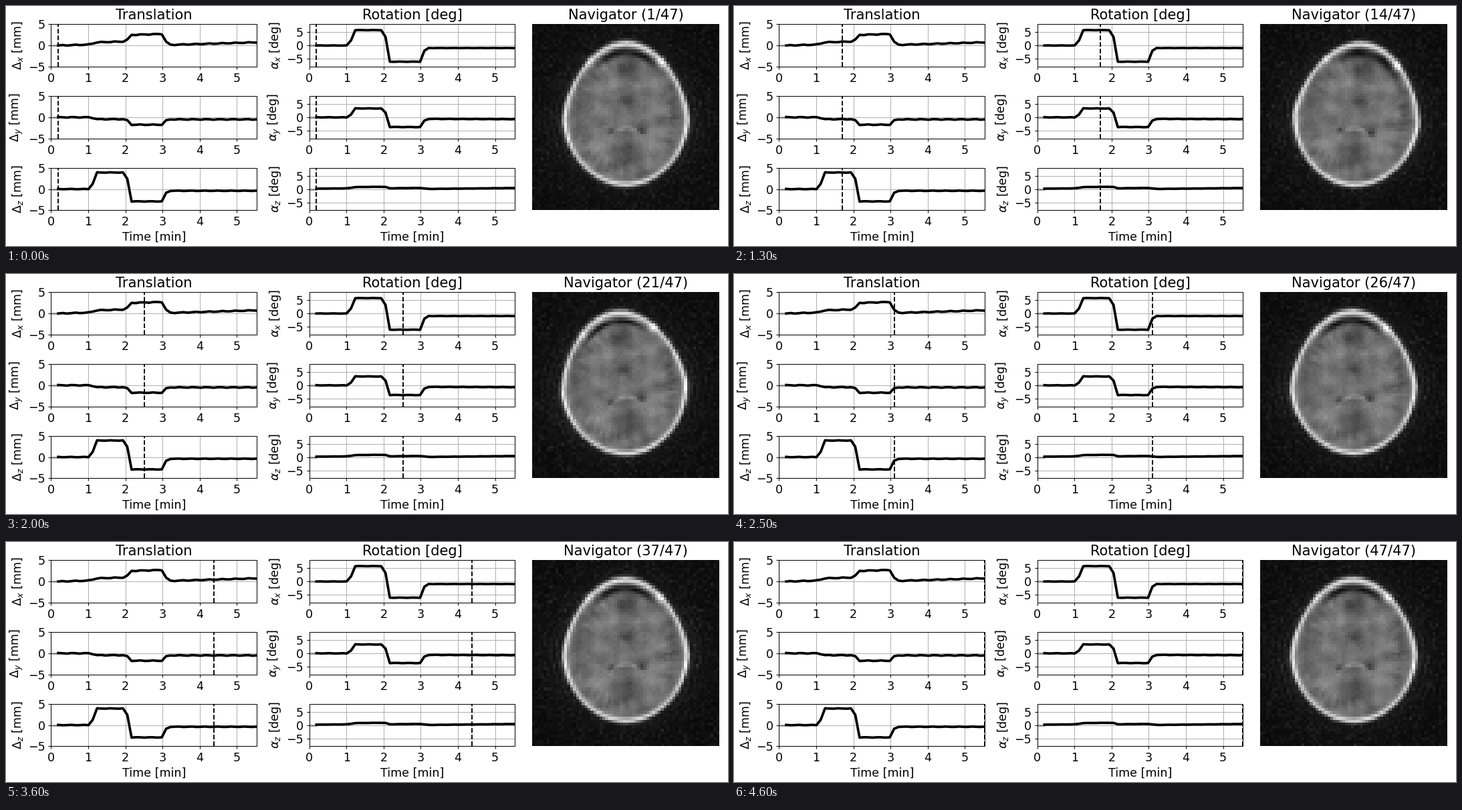
Recreate the animation shown at these times as a matplotlib script. Size 1080 by 360 pixels, loop 4700 ms.

```python
import numpy as np
import matplotlib.pyplot as plt
from matplotlib.animation import FuncAnimation

W, H, DPI = 1080, 360, 90
FRAMES, STEP_MS = 47, 100
GRID = 64          # scan resolution
FOV = 280          # scan size on the stage, px

plt.rcParams.update({"font.family": "DejaVu Sans", "font.size": 14})

steps = np.arange(FRAMES)
minutes = 0.192 + 0.1162 * steps

# The head rests, takes pose 1, takes pose 2 and settles again (phase 0 to 3)
phase = np.interp(steps, [7, 8, 9, 15, 16, 17, 24, 25, 26],
                  [0, 0.33, 1, 1, 1.22, 2, 2, 2.8, 3])
since = steps - np.array([0, 9, 17, 26])[phase.astype(int)]


def course(levels, creep=0.0, wobble=0.05, lag=0.0):
    """Follow the four pose levels, with slow creep and a breathing wobble."""
    breath = np.sin(2 * np.pi * steps / 3.1 + lag)
    return np.interp(phase, range(4), levels) + creep * since + wobble * breath


shift_x = course((0, 0.75, 2.5, 0.15), creep=0.03, wobble=0.09)
shift_y = course((0, -0.45, -1.75, -0.5), wobble=0.08, lag=1)
shift_z = course((0, 3.9, -2.9, -0.4), lag=2)
rot_x = course((0, 5.8, -6.1, -0.95))
rot_y = course((0, 3.35, -3.65, -0.6), creep=-0.006, wobble=0.06, lag=2)
rot_z = course((0.15, 0.75, 0.3, 0.05), creep=0.018, wobble=0.03)

rng = np.random.default_rng(7)
cell = (np.arange(GRID) + 0.5) / GRID * FOV - FOV / 2
SX, SY = np.meshgrid(cell, cell)
still_noise = rng.normal(size=(GRID, GRID))
waves = rng.uniform((0.09, 0, 0), (0.36, np.pi, 2 * np.pi), size=(12, 3))


def bell(v, mid, width):
    return np.exp(-((v - mid) / width) ** 2)


def spot(x, y, cx, cy, rx, ry):
    return bell(x, cx, rx) * bell(y, cy, ry)


def ramp(v, lo, hi):
    t = np.clip((v - lo) / (hi - lo), 0, 1)
    return t * t * (3 - 2 * t)


def tissue(x, y, r, ang):
    """Brain brightness; both halves mirror each other about the midline."""
    side = np.abs(x - 1)
    grey = 108 + 22 * spot(side, y, 16, -46, 13, 6)     # front fibres
    grey += 16 * spot(side, y, 40, -10, 14, 34)         # white matter
    grey += 22 * spot(side, y, 38, 45, 18, 18)
    grey -= 24 * spot(side, y, 70, -12, 10, 28)         # side folds
    grey -= 55 * spot(side, y, 22, 23, 6, 5)            # ventricles
    grey -= 50 * spot(side, y, 0, -22, 11, 8)
    grey -= 32 * spot(side, y, 0, -74, 11, 18)          # midline
    grey -= 26 * spot(side, y, 0, 58, 18, 28)
    arch = np.hypot(side / 24, (y - 38) / 21)
    grey += 38 * bell(arch, 1, 0.17) * ramp(-y, -38, -22)
    for freq, turn, start in waves:
        grey += 3 * np.sin(freq * (x * np.cos(turn) + y * np.sin(turn)) + start)
    folds = np.sin(26 * ang + 5 * np.sin(3 * ang) + 9 * r)
    return grey + 7 * bell(r, 0.74, 0.12) * folds


def scan(k):
    """Head slice in the pose of step k, as a grey image."""
    a = np.radians(rot_x[k])
    px, py = SX - shift_z[k], SY - 0.6 * shift_x[k]
    x = px * np.cos(a) + py * np.sin(a)
    y = py * np.cos(a) - px * np.sin(a)

    # egg-shaped outline, r = 1 on the skin
    hx, hy = x - 0.5, y - 5
    v = np.where(hy < 0, hy / 120, hy / 101)
    half = 96 * (1 - np.where(v < 0, 0.12, 0.06) * np.clip(np.abs(v), 0, 1))
    r = np.hypot(hx / half, v)
    depth = (1 - r) * 100
    ang = np.arctan2(hy, hx)

    # crescent of air behind the forehead, sliding with the tilt
    ax = x - 3 - 1.5 * rot_x[k]
    air = bell(depth, 15, 5.5 + 0.3 * rot_x[k]) * np.exp(-(ax / 44) ** 4)
    air *= (1 - 0.35 * bell(ax, 0, 12)) * (y < 0)
    brain = tissue(x, y, r, ang) * (1 - 0.88 * air)

    bone = 165 + 30 * np.cos(2 * ang) ** 2
    ring = bone * bell(depth, 4.5, 4.2)
    ring += 70 * spot(np.abs(x), y, 53, -82, 7, 7) * np.where(x > 0, 1, 0.6)

    grain = np.random.default_rng(100 + k).normal(size=(GRID, GRID))
    noise = 0.75 * still_noise + 0.65 * grain
    halo = np.exp(-4 * np.clip(r - 1, 0, None))
    ripple = 0.5 + 0.5 * np.sin(60 * r + 2 * np.sin(7 * ang))
    outside = 8 + 8 * np.abs(noise) + halo * (9 + 20 * ripple * np.cos(ang) ** 2)

    inside = ramp(depth, 4, 12)
    img = inside * (brain + 3 * noise) + (1 - inside) * outside + ring
    return np.clip(img, 0, 255)


def place(x, y, w, h):
    return fig.add_axes([x / W, 1 - (y + h) / H, w / W, h / H])


def chart(x, row, lim, label, data):
    ax = place(x, 27.4 + 107.68 * row, 307.8, 63.7)
    ax.plot([0, minutes[0]], [0, 0], color="gray", lw=2)
    ax.plot(minutes, data, color="black", lw=3)
    ax.set_xlim(0, minutes[-1])
    ax.set_ylim(-lim, lim)
    ax.set_xticks(range(6))
    ax.set_yticks([-5, 0, 5])
    ax.grid(True)
    ax.set_ylabel(label)
    cursors.append(ax.axvline(minutes[0], color="black", ls="--", lw=1.5))
    return ax


fig = plt.figure(figsize=(W / DPI, H / DPI), dpi=DPI, facecolor="white")
cursors = []
columns = [
    (67.4, 5, "Translation", r"\Delta", "mm", (shift_x, shift_y, shift_z)),
    (453.69, 8, "Rotation [deg]", r"\alpha", "deg", (rot_x, rot_y, rot_z)),
]
for x, lim, title, symbol, unit, series in columns:
    charts = [chart(x, row, lim, f"${symbol}_{name}$ [{unit}]", data)
              for row, (name, data) in enumerate(zip("xyz", series))]
    charts[0].set_title(title)
    charts[-1].set_xlabel("Time [min]")

view = place(787.2, 27.4, 279.4, 279.06)
view.set_axis_off()
picture = view.imshow(scan(0), cmap="gray", vmin=0, vmax=255,
                      interpolation="nearest", aspect="auto")
heading = view.set_title("")


def update(k):
    for cursor in cursors:
        cursor.set_xdata([minutes[k]] * 2)
    picture.set_data(scan(k))
    heading.set_text(f"Navigator ({k + 1}/{FRAMES})")
    return [*cursors, picture, heading]


anim = FuncAnimation(fig, update, frames=FRAMES, interval=STEP_MS,
                     init_func=lambda: update(0), repeat=True, repeat_delay=0)
plt.show()
```
